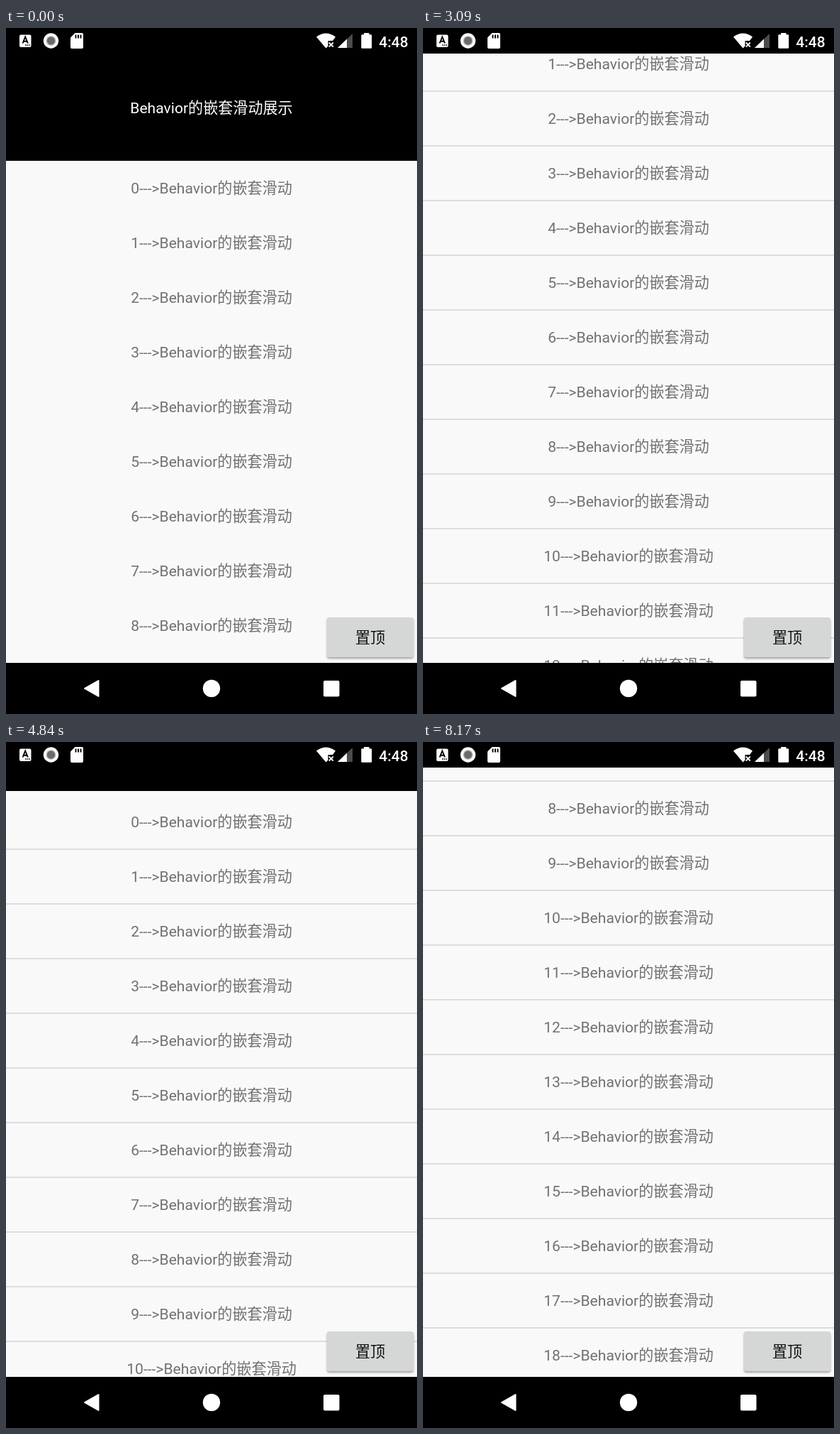
An HTML page for the animation above (8250 ms loop, 580x966 px).

```html
<!DOCTYPE html>
<html lang="zh-CN">
<head>
<meta charset="utf-8">
<title>Behavior的嵌套滑动展示</title>
<style>
  html, body { margin: 0; width: 100%; height: 100%; overflow: hidden; background: #000; }
  body {
    position: relative;
    font: 21.1px Roboto, "Noto Sans CJK SC", "Noto Sans CJK", sans-serif;
    text-align: center;
  }
  .view, .page, .list, .rows, .bars { position: absolute; left: 0; width: 580px; }
  .view { top: 36px; height: 858px; overflow: hidden; background: #f9f9f9; }
  .page { top: 0; animation: page 8.25s infinite; }
  .title { height: 151px; line-height: 154px; background: #000; color: #fff; }
  .list { top: 151px; height: 858px; overflow: hidden; background: #f9f9f9; }
  .rows { top: 0; animation: rows 8.25s infinite; }
  .row { position: relative; height: 77px; line-height: 78px; color: #717171; white-space: nowrap; }
  .row::after {
    content: ""; position: absolute; left: 0; top: 76px; width: 100%; height: 2px;
    background: #dddde0; animation: line 8.25s linear infinite;
  }
  .button {
    position: absolute; left: 453px; top: 830px; width: 122px; height: 56px; line-height: 57px;
    border-radius: 3px; background: #d5d6d6; color: #111;
    box-shadow: 0 2px 3px rgba(0, 0, 0, .35);
  }
  .bars { top: 0; height: 966px; fill: #fff; }

  /* 24 steps per second, 198 steps per loop */
  @keyframes page {
    0%      { top: 0; animation-timing-function: step-end; }
    22.222% { top: 0; animation-timing-function: steps(6); }
    25.253% { top: -24px; animation-timing-function: steps(7); }
    28.788% { top: -76px; animation-timing-function: steps(8); }
    32.828% { top: -151px; animation-timing-function: step-end; }
    57.071% { top: -151px; animation-timing-function: steps(3); }
    58.586% { top: -118px; animation-timing-function: steps(9); }
    63.131% { top: -38px; animation-timing-function: steps(10); }
    68.182% { top: 0; animation-timing-function: step-end; }
    71.717% { top: 0; animation-timing-function: steps(5); }
    74.242% { top: -101px; animation-timing-function: steps(2); }
    75.253%, 100% { top: -151px; animation-timing-function: step-end; }
  }
  @keyframes rows {
    0%      { top: 0; animation-timing-function: step-end; }
    22.222% { top: 0; animation-timing-function: steps(13); }
    28.788% { top: -4px; animation-timing-function: steps(8); }
    32.828% { top: -12px; animation-timing-function: steps(9); }
    37.374% { top: -101px; animation-timing-function: steps(10); }
    42.424% { top: -190px; animation-timing-function: steps(8); }
    46.465% { top: -238px; animation-timing-function: steps(4); }
    48.485% { top: -243px; animation-timing-function: steps(4); }
    50.505% { top: -230px; animation-timing-function: steps(4); }
    52.525% { top: -183px; animation-timing-function: steps(5); }
    55.051% { top: -84px; animation-timing-function: steps(4); }
    57.071% { top: 0; animation-timing-function: steps(3); }
    58.586% { top: 5px; animation-timing-function: steps(9); }
    63.131% { top: 2px; animation-timing-function: steps(10); }
    68.182% { top: 0; animation-timing-function: step-end; }
    71.717% { top: 0; animation-timing-function: steps(5); }
    74.242% { top: -62px; animation-timing-function: steps(2); }
    75.253% { top: -125px; animation-timing-function: steps(4); }
    77.273% { top: -331px; animation-timing-function: steps(4); }
    79.293% { top: -479px; animation-timing-function: steps(4); }
    81.313% { top: -567px; animation-timing-function: steps(4); }
    83.333%, 100% { top: -597px; animation-timing-function: step-end; }
  }
  @keyframes line {
    0%, .5% { opacity: 0; }
    9%, 100% { opacity: 1; }
  }
</style>
</head>
<body>
<div class="view">
  <div class="page">
    <div class="title">Behavior的嵌套滑动展示</div>
    <div class="list"><div class="rows" id="rows"></div></div>
  </div>
</div>
<div class="button">置顶</div>
<svg class="bars" width="580" height="966" viewBox="0 0 580 966">
  <rect width="580" height="36" fill="#000"/>
  <rect y="894" width="580" height="72" fill="#000"/>

  <!-- status icons -->
  <rect x="19" y="9.500" width="16.500" height="17.500" rx="2"/>
  <path d="M23.500 21.500 27.200 12.500 30.900 21.500M24.800 18.700h4.800" fill="none" stroke="#000" stroke-width="1.900"/>
  <path d="M27 24h1.600m1 0h1.600m1 0h1.600" stroke="#000" stroke-width="1.400"/>
  <circle cx="63.500" cy="18" r="10.700"/>
  <circle cx="63.500" cy="18" r="6.800" fill="#aaa"/>
  <circle cx="63.500" cy="18" r="5.400" fill="#6a6a6a"/>
  <path d="M97.500 7H107a2 2 0 0 1 2 2V27a2 2 0 0 1-2 2H93a2 2 0 0 1-2-2V13.500z"/>
  <path d="M98.500 9.500v5m3.500-5v5m3.500-5v5" stroke="#000" stroke-width="1.900"/>
  <path d="M438 12.500Q451.500 2.500 465 12.500L461 18H454.500V25.500L451.500 28.500z"/>
  <path d="m455.800 20.500 6 6m0-6-6 6" stroke="#fff" stroke-width="1.800"/>
  <path d="M468 28 489 8V28z" fill="#4c4c4c"/>
  <path d="M468 28 481 15.600V28z"/>
  <path d="M505 7h7.500v2.300H515a1.200 1.200 0 0 1 1.200 1.200V27.600a1.200 1.200 0 0 1-1.200 1.200H502.500a1.200 1.200 0 0 1-1.200-1.200V10.500a1.200 1.200 0 0 1 1.200-1.200H505z"/>
  <text x="547" y="26.500" font-size="21" font-weight="500" text-anchor="middle">4:48</text>

  <!-- navigation -->
  <path d="M111 930 130.500 919V941z" stroke="#fff" stroke-width="2" stroke-linejoin="round"/>
  <circle cx="290" cy="930" r="12.200"/>
  <rect x="448" y="919" width="22.500" height="22.500" rx="2"/>
</svg>
<script>
  const rows = document.getElementById("rows");
  for (let i = 0; i < 20; i++) {
    const row = document.createElement("div");
    row.className = "row";
    row.textContent = `${i}--->Behavior的嵌套滑动`;
    rows.append(row);
  }
</script>
</body>
</html>
```
